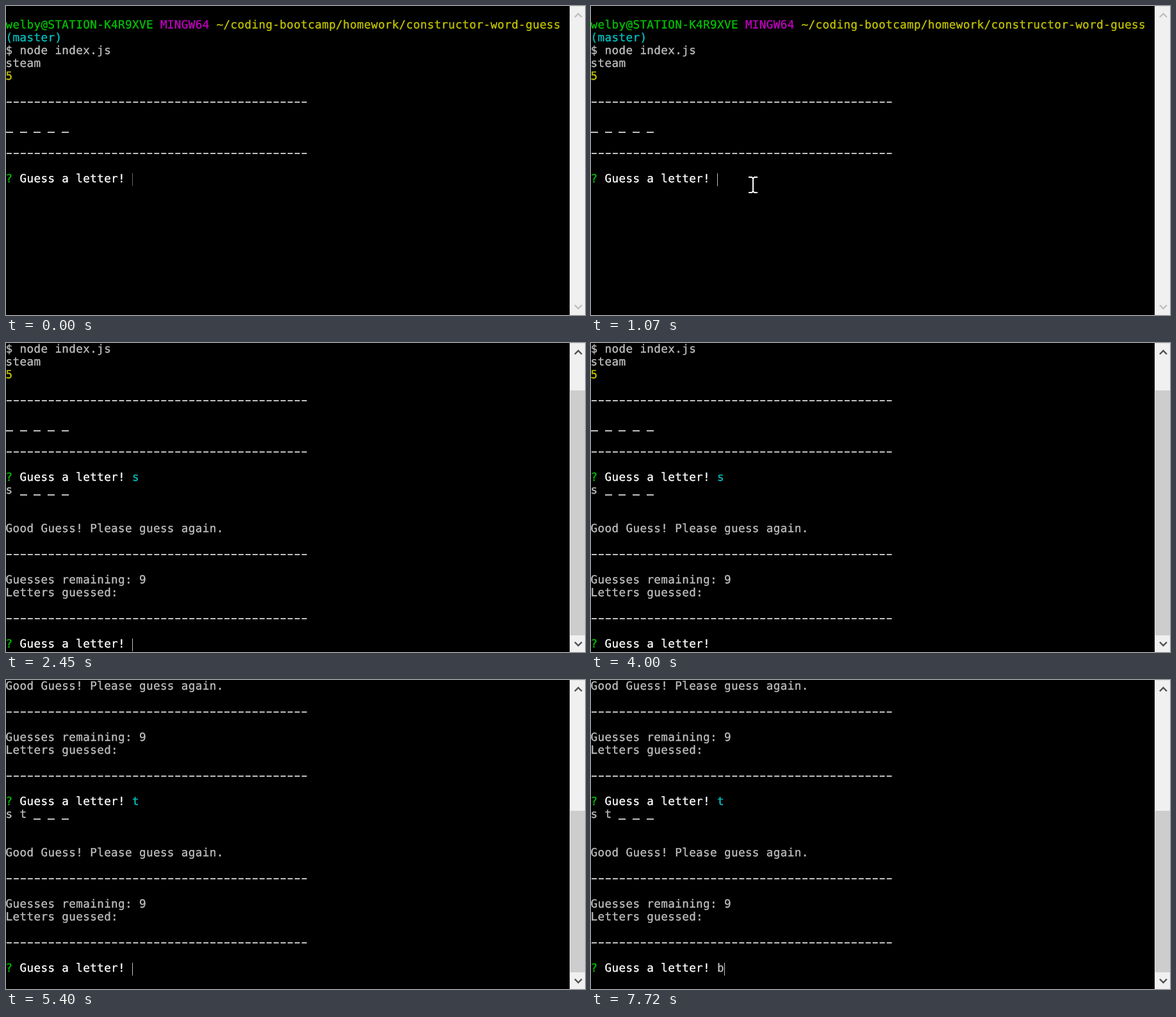
Recreate the animation shown at these times as an HTML page. Size 904 by 482 pixels, loop 8000 ms.

```html
<!DOCTYPE html>
<html lang="en">
<head>
<meta charset="utf-8">
<title>Word guess in a terminal</title>
<style>
  html, body { margin: 0; width: 100%; height: 100%; overflow: hidden; background: #000; }
  #stage { position: relative; width: 904px; height: 482px; overflow: hidden; background: #000; }
  #stage * { animation: 8s step-end infinite; }

  #log {
    position: absolute; left: -.4px; top: 0; margin: 0; color: #bfbfbf;
    font: 17.6px/20px "DejaVu Sans Mono", monospace; letter-spacing: .375px;
    text-rendering: geometricPrecision; -webkit-text-stroke: .35px;
    animation-name: scroll;
  }
  #log div { height: 20px; white-space: pre; }
  #log .block { height: auto; }
  .green { color: #00c200; }
  .magenta { color: #c200c2; }
  .yellow { color: #c2c200; }
  .cyan { color: #00c2c2; }
  .white { color: #fff; }

  /* hyphens and underscores as bars on the character grid */
  .bar {
    --from: 1.4px; --to: 9.4px;
    display: inline-block; height: 20px; vertical-align: top; color: transparent;
    background: linear-gradient(90deg, transparent var(--from), #bfbfbf var(--from) var(--to), transparent var(--to))
      0 9px / 10.97px 2px repeat-x;
  }
  .low { --from: .4px; --to: 10.8px; background-position-y: 16px; }

  #round2 { animation-name: second; }
  #round3 { animation-name: third; }
  #key1 { animation-name: key1; }
  #key2 { animation-name: key2; }
  #key3 { animation-name: key3; }

  #caret {
    position: absolute; left: 0; top: 0; width: 1px; height: 20px;
    background-color: #bfbfbf; animation-name: place, blink, focus;
  }
  #pointer {
    position: absolute; left: 0; top: 0; width: 14px; height: 26px;
    fill: none; stroke: #fff; stroke-width: 2; animation-name: point;
  }

  #bar {
    position: absolute; left: 880px; top: 0; width: 24px; height: 482px;
    background: #f0f0f0; box-shadow: inset 1px 1px #e3e3e3;
  }
  #thumb { position: absolute; left: 1px; right: 0; bottom: 26px; background: #cdcdcd; animation-name: thumb; }
  #bar svg { position: absolute; left: 0; top: 0; fill: none; stroke-width: 2.4; animation-name: arrows; }

  @keyframes scroll {
    0% { transform: none; }
    30.625% { transform: translateY(-60px); }
    67.5%, 100% { transform: translateY(-340px); }
  }
  @keyframes second { 0% { visibility: hidden; } 30.625%, 100% { visibility: visible; } }
  @keyframes third { 0% { visibility: hidden; } 67.5%, 100% { visibility: visible; } }

  @keyframes key1 {
    0% { opacity: 0; color: #bfbfbf; }
    20% { opacity: 1; color: #bfbfbf; }
    30.625%, 100% { opacity: 1; color: #00c2c2; }
  }
  @keyframes key2 {
    0% { opacity: 0; color: #bfbfbf; }
    63.625% { opacity: 1; color: #bfbfbf; }
    67.5%, 100% { opacity: 1; color: #00c2c2; }
  }
  @keyframes key3 { 0% { opacity: 0; } 96.5%, 100% { opacity: 1; } }

  @keyframes place {
    0% { transform: translate(197px, 261px); }
    20% { transform: translate(208px, 261px); }
    30.625% { transform: translate(197px, 461px); }
    63.625% { transform: translate(208px, 461px); }
    67.5% { transform: translate(197px, 441px); }
    96.5%, 100% { transform: translate(208px, 441px); }
  }
  @keyframes blink {
    0%, 20%, 29.75%, 43.375%, 56.75%, 81.25%, 93.875%, 100% { opacity: 1; }
    17%, 26.875%, 36.625%, 50%, 74.375%, 86.75% { opacity: 0; }
  }
  @keyframes focus {
    0% { background-image: repeating-linear-gradient(transparent 0 1px, #000 1px 2px); }
    10.25%, 100% { background-image: none; }
  }

  @keyframes point {
    0% { transform: translate(572px, 384px); opacity: 0; }
    1.625% { transform: translate(572px, 384px); opacity: 1; }
    2.625% { transform: translate(390px, 190px); opacity: 1; }
    3.625% { transform: translate(239px, 76px); opacity: 1; }
    5.5% { transform: translate(243px, 140px); opacity: 1; }
    6.375% { transform: translate(253px, 216px); opacity: 1; }
    7.375% { transform: translate(246px, 265px); opacity: 1; }
    10.25% { transform: translate(250px, 267px); opacity: 1; }
    11.25% { transform: translate(246px, 265px); opacity: 1; }
    13.375% { transform: translate(246px, 266px); opacity: 1; }
    21%, 100% { transform: translate(246px, 266px); opacity: 0; }
  }

  @keyframes thumb {
    0% { top: 74px; opacity: 0; }
    30.625% { top: 74px; opacity: 1; }
    67.5%, 100% { top: 204px; opacity: 1; }
  }
  @keyframes arrows { 0% { stroke: #bfbfbf; } 30.625%, 100% { stroke: #505050; } }
</style>
</head>
<body>
<div id="stage">
  <div id="log"></div>
  <div id="caret"></div>
  <svg id="pointer" viewBox="0 0 14 26"><path d="M0 1H5L7 3L9 1H14M7 3V23M0 25H5L7 23L9 25H14"/></svg>
  <div id="bar">
    <div id="thumb"></div>
    <svg width="24" height="482"><path d="M8 17.5L13.5 12L19 17.5M8 466.5L13.5 472L19 466.5"/></svg>
  </div>
</div>
<script>
  const tint = (color, text) => `<span class="${color}">${text}</span>`;
  const rule = tint('bar', '-'.repeat(43));
  const word = text => text.replace(/_/g, tint('bar low', '_'));
  const prompt = (id, key) =>
    `${tint('green', '?')} ${tint('white', 'Guess a letter!')} <span id="${id}">${key}</span>`;
  const block = (id, lines) =>
    `<div class="block" id="${id}">${lines.map(line => `<div>${line}</div>`).join('')}</div>`;
  const round = (shown, id, key) => [
    word(shown), '', '',
    'Good Guess! Please guess again.', '',
    rule, '',
    'Guesses remaining: 9',
    'Letters guessed:', '',
    rule, '',
    prompt(id, key)
  ];

  document.getElementById('log').innerHTML =
    block('round1', [
      '',
      tint('green', 'welby@STATION-K4R9XVE') + ' ' + tint('magenta', 'MINGW64') + ' ' +
        tint('yellow', '~/coding-bootcamp/homework/constructor-word-guess'),
      tint('cyan', '(master)'),
      '$ node index.js',
      'steam',
      tint('yellow', '5'), '',
      rule, '',
      word('_ _ _ _ _'), '',
      rule, '',
      prompt('key1', 's')
    ]) +
    block('round2', round('s _ _ _ _', 'key2', 't')) +
    block('round3', round('s t _ _ _', 'key3', 'b'));
</script>
</body>
</html>
```
